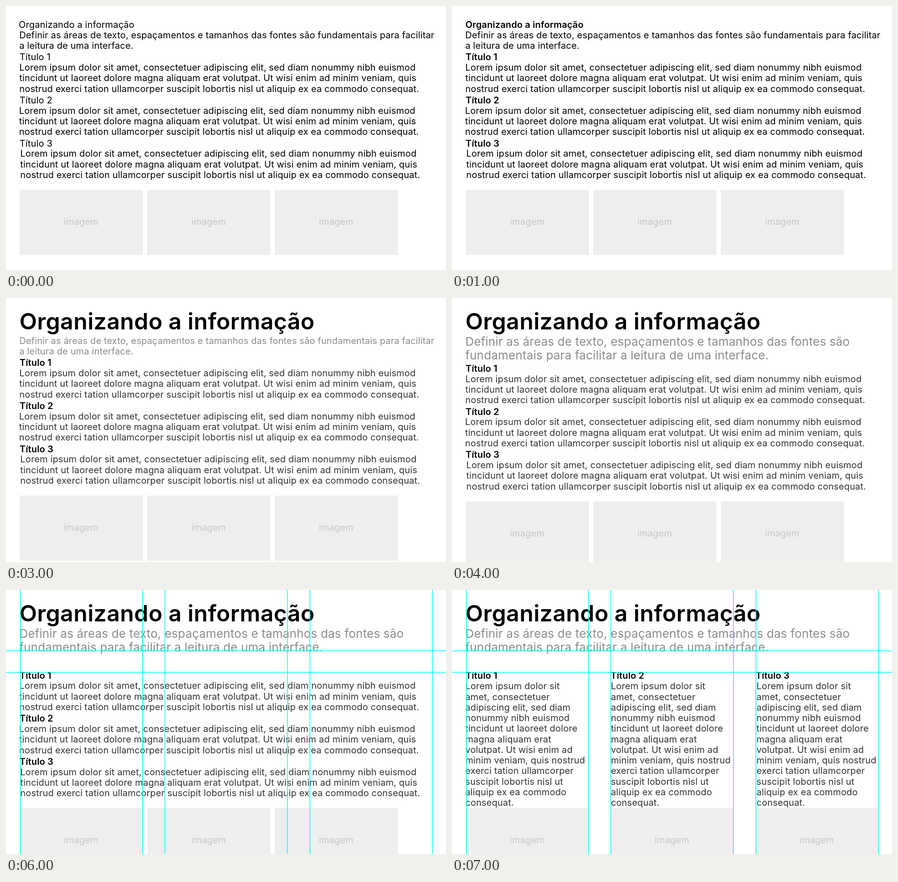
Animation, 966 px wide and 580 px high, one loop 8 s. Source, as an HTML page:

```html
<!DOCTYPE html>
<html lang="pt">
<head>
<meta charset="utf-8">
<style>
html, body { margin: 0; width: 100%; height: 100%; overflow: hidden; background: #fff; }
svg { display: block; }
text { font-family: Inter, sans-serif; font-optical-sizing: none; letter-spacing: .0075em; }
line { stroke: #0ff; stroke-width: 1.5; }
</style>
</head>
<body>
<svg id="stage" width="966" height="580" viewBox="0 0 966 580"></svg>
<script>
const STEP = 1000, STEPS = 8, LEADING = 23.25;
const stage = document.getElementById('stage');

const heading = 'Organizando a informação';
const introSmall = [
  'Definir as áreas de texto, espaçamentos e tamanhos das fontes são fundamentais para facilitar',
  'a leitura de uma interface.'];
const introLarge = [
  'Definir as áreas de texto, espaçamentos e tamanhos das fontes são',
  'fundamentais para facilitar a leitura de uma interface.'];
const wide = [
  'Lorem ipsum dolor sit amet, consectetuer adipiscing elit, sed diam nonummy nibh euismod',
  'tincidunt ut laoreet dolore magna aliquam erat volutpat. Ut wisi enim ad minim veniam, quis',
  'nostrud exerci tation ullamcorper suscipit lobortis nisl ut aliquip ex ea commodo consequat.'];
const narrow = [
  'Lorem ipsum dolor sit', 'amet, consectetuer', 'adipiscing elit, sed diam',
  'nonummy nibh euismod', 'tincidunt ut laoreet dolore', 'magna aliquam erat',
  'volutpat. Ut wisi enim ad', 'minim veniam, quis nostrud', 'exerci tation ullamcorper',
  'suscipit lobortis nisl ut', 'aliquip ex ea commodo', 'consequat.'];

const text = (str, x, y, fill = '#000', size = 20, weight = 400, anchor = 'start') =>
  `<text x="${x}" y="${y}" fill="${fill}" font-size="${size}" font-weight="${weight}" text-anchor="${anchor}">${str}</text>`;
const block = (lines, x, y, fill, size = 20, leading = LEADING) =>
  lines.map((str, i) => text(str, x, y + i * leading, fill, size)).join('');
const hGuide = y => `<line x1="0" x2="966" y1="${y}" y2="${y}"/>`;
const vGuide = x => `<line x1="${x}" x2="${x}" y1="0" y2="580"/>`;

// Each step adds one design decision to the page.
function draw(step) {
  const bold = step >= 1, toned = step >= 2, bigHeading = step >= 3, bigIntro = step >= 4;
  const spaced = step >= 5, ruled = step >= 6, columns = step >= 7;
  const weight = bold ? 600 : 400;
  const shift = spaced ? 75.4 : bigIntro ? 42.6 : bigHeading ? 30 : 0;
  const introColor = toned ? '#8c8c8c' : '#000';
  const bodyColor = toned ? '#333' : '#000';

  let out = bigHeading
    ? text(heading, 29.5, 68.5, '#000', 50, weight)
    : text(heading, bold ? 29.5 : 28, 48, '#000', 20, weight);
  out += bigIntro
    ? block(introLarge, 29.2, 105, introColor, 26, 30)
    : block(introSmall, 29.2, bigHeading ? 101 : 71, introColor);

  for (let i = 0; i < 3; i++) {
    const imageX = 30 + i * (columns ? 318 : 280);
    const imageY = Math.round(404 + shift);
    out += `<rect x="${imageX}" y="${imageY}" width="270.5" height="143" fill="#eee"/>`;
    out += text('imagem', imageX + 135, 481 + shift, '#c8c8c8', 20, 400, 'middle');

    const top = shift + (columns ? 0 : i * 94.7);
    out += text('Título ' + (i + 1), 29.8 + (columns ? i * 318.5 : 0), 119.2 + top, '#000', 20, weight);
    out += columns
      ? block(narrow, 29.2 + i * 319.7, 143 + top, bodyColor)
      : block(wide, [29.3, 28.7, 31.3][i], 142 + top, bodyColor);
  }
  if (spaced) out += [133.75, 180.75].map(hGuide).join('');
  if (ruled) out += [31.75, 299.75, 348.75, 617.75, 667.25, 936.25].map(vGuide).join('');
  stage.innerHTML = out;
}

let shown = -1;
function tick() {
  const step = Math.floor(performance.now() / STEP) % STEPS;
  if (step !== shown) draw(shown = step);
  requestAnimationFrame(tick);
}
tick();
</script>
</body>
</html>
```
